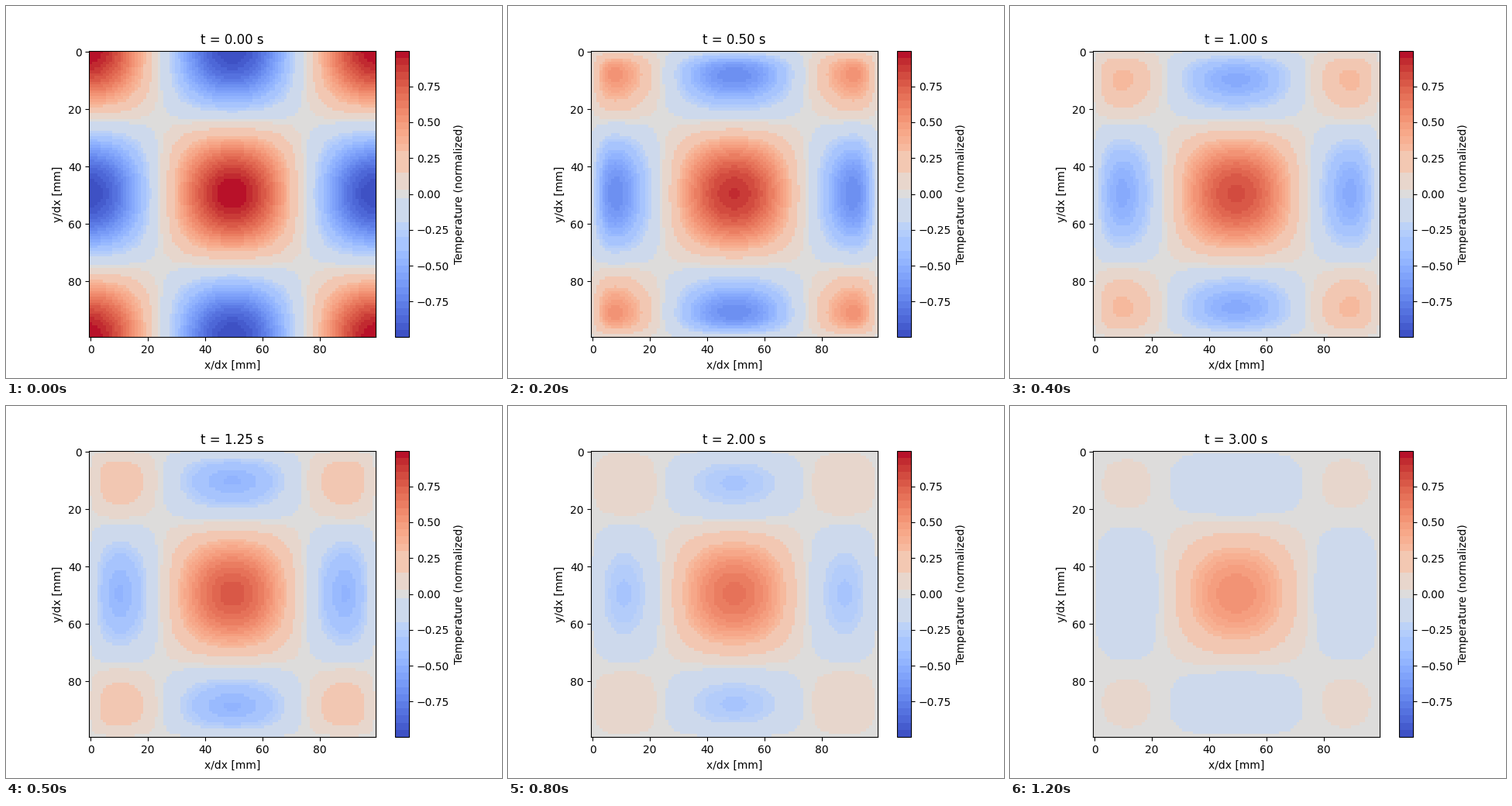
A matplotlib script that plays this animation: 640 px wide and 480 px high, repeating every 1.3 s.

```python
import numpy as np
import matplotlib.pyplot as plt
from matplotlib.animation import FuncAnimation
from matplotlib.colors import ListedColormap

N = 100            # interior grid points per side
FRAMES = 13
DT = 0.25          # seconds of heat flow per frame
ALPHA = 0.00253    # diffusivity in units of the side length

x = np.arange(1, N + 1) / (N + 1)
k = np.arange(1, N + 1)
modes = np.sin(np.pi * np.outer(k, x))
coef = 2 / (N + 1) * modes @ np.cos(2 * np.pi * x)


def field(t):
    """Heat equation with cold edges; the solution separates in x and y."""
    g = (coef * np.exp(-ALPHA * (np.pi * k) ** 2 * t)) @ modes
    return np.outer(g, g)


def banded_map(samples=200):
    """Coolwarm in flat bands, wider around zero."""
    outer = np.arange(0.4, 1.01, 0.05)
    edges = np.concatenate([-outer[::-1], [-0.3, -0.25, -0.2, -0.03],
                            [0.03, 0.15, 0.3, 0.35], outer])
    mids = (edges[:-1] + edges[1:]) / 2
    v = (np.arange(samples) + 0.5) / samples * 2 - 1
    band = np.clip(np.searchsorted(edges, v) - 1, 0, len(mids) - 1)
    return ListedColormap(plt.get_cmap("coolwarm")((mids[band] + 1) / 2))


fig, ax = plt.subplots(figsize=(6.4, 4.8), dpi=100)
start = field(0)
im = ax.imshow(start, cmap=banded_map(), vmin=start.min(), vmax=start.max())
fig.colorbar(im, ax=ax, label="Temperature (normalized)")
ax.set_xlabel("x/dx [mm]")
ax.set_ylabel("y/dx [mm]")
title = ax.set_title("t = 0.00 s")


def update(i):
    t = i * DT
    im.set_data(field(t))
    title.set_text(f"t = {t:.2f} s")
    return im, title


anim = FuncAnimation(fig, update, frames=FRAMES, interval=100,
                     repeat=True, repeat_delay=0)
plt.show()
```
